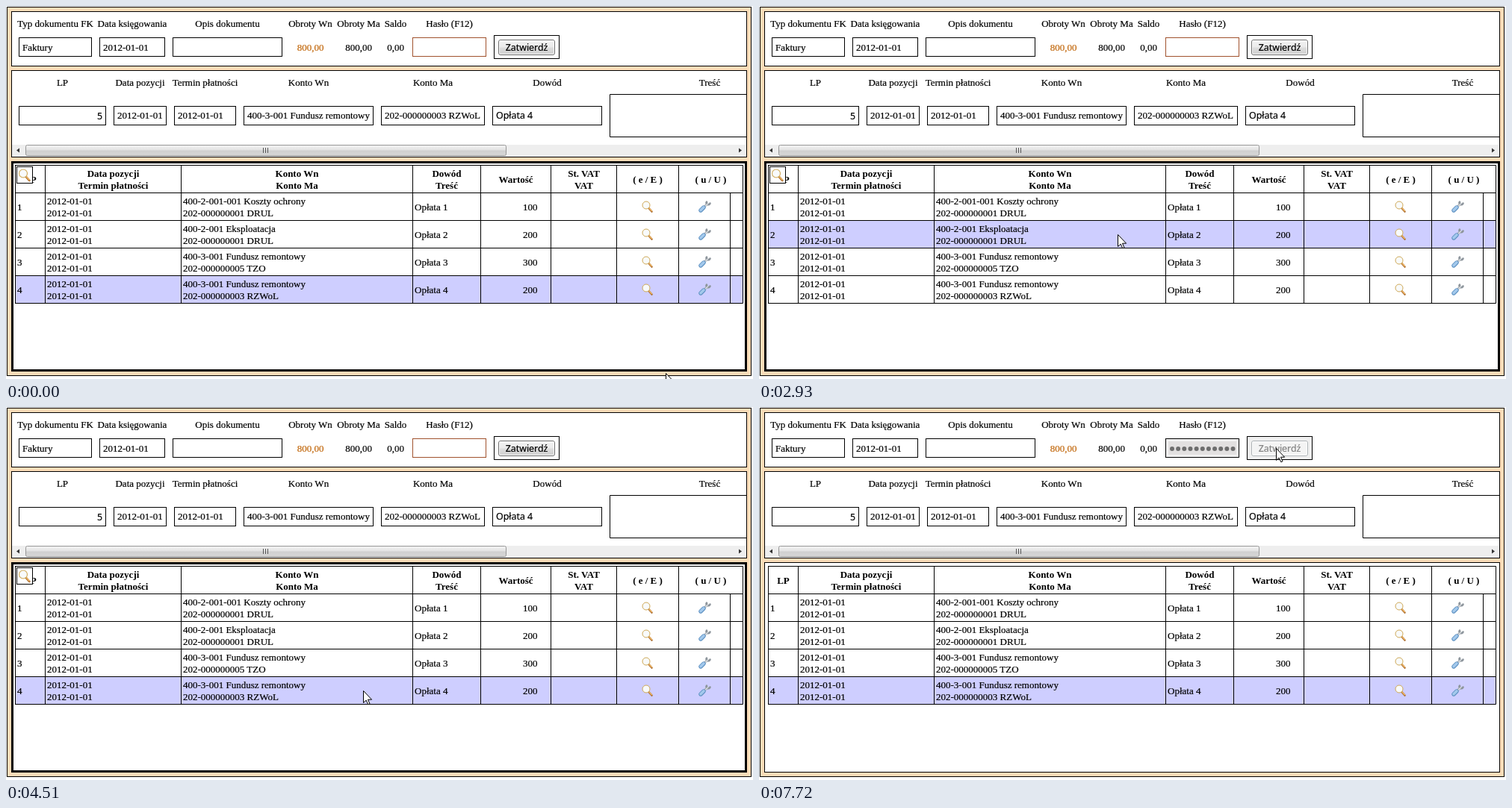
Animation, 1000 px wide and 500 px high, one loop 8000 ms. Source, as an HTML page:

```html
<!DOCTYPE html>
<html lang="pl">
<head>
<meta charset="utf-8">
<title>Dokument FK</title>
<style>
html, body { margin: 0; width: 100%; height: 100%; overflow: hidden; background: #fff; }
svg { display: block; width: 100%; height: 100%; }
text { font: 13px "Liberation Serif", serif; white-space: pre; fill: currentColor; stroke: currentColor; stroke-width: .2; }
.b { font-weight: bold; stroke: none; }
.s { font: 12.4px "Noto Sans", sans-serif; }
.line { fill: none; stroke: #000; }
.box { fill: #fff; stroke: #000; }
</style>
</head>
<body>
<svg id="stage" viewBox="0 0 1000 500" xmlns="http://www.w3.org/2000/svg"></svg>
<script>
const LOOP = 8000, STEP = 80, GAP = 10;
const TABLE = {x: 12, y: 213, head: 250, row: 37};
const stage = document.getElementById('stage');

// ---- markup helpers ----
const text = (x, y, str, anchor = 'start', cls = '', extra = '') =>
  `<text x="${x}" y="${y}" text-anchor="${anchor}" class="${cls}" ${extra}>${str}</text>`;
const mid = (x, y, str, cls, extra) => text(x, y, str, 'middle', cls, extra);
// One pixel frame inside an outer size of w by h
const box = (x, y, w, h, extra = '') =>
  `<rect class="box" x="${x + .5}" y="${y + .5}" width="${w - 1}" height="${h - 1}" ${extra}/>`;
const path = (d, extra = '') => `<path d="${d}" ${extra}/>`;
const gradient = (id, ...colors) =>
  `<linearGradient id="${id}" x2="0" y2="1">` +
  colors.map((c, i) => `<stop offset="${[0, .48, .52, 1][i]}" stop-color="${c}"/>`).join('') +
  '</linearGradient>';

// Lays items out from left to right with an equal gap
function flow(items, gap, draw, x = 17) {
  return items.map(item => {
    const out = draw(x, ...item);
    x += item[0] + gap;
    return out;
  }).join('');
}

const lens = (x, y, k = 1) => `<g transform="translate(${x} ${y}) scale(${k})">` +
  path('M3.5 4L7.5 8.5', 'stroke="#a5672a" stroke-width="2.6" stroke-linecap="round"') +
  path('M4 4L7.3 7.8', 'stroke="#f0b765" stroke-width="1.4" stroke-linecap="round"') +
  '<circle r="5" fill="#f8fafc" stroke="#cfa956"/></g>';

const wrench = (x, y) => `<g transform="translate(${x} ${y})" fill="none" stroke-linecap="round">` +
  path('M-1 1L4 -4M3 -6.5Q1.5 -4 4 -3Q6.5 -2 7.5 -4.5', 'stroke="#8d959c" stroke-width="2.6"') +
  path('M-1 1L4.5 -4', 'stroke="#dfe3e6" stroke-width="1.4"') +
  path('M-5 5L-1 1', 'stroke="#5c8fc0" stroke-width="5.4"') +
  path('M-5 4.8L-1 .8', 'stroke="#a3c9ec" stroke-width="3.6"') + '</g>';

// ---- still parts ----
function topForm() {
  const fields = [[98, 'Typ dokumentu FK', 'Faktury'], [88, 'Data księgowania', '2012-01-01'],
    [147, 'Opis dokumentu', ''], [55, 'Obroty Wn', '800,00', '#c06508'], [54, 'Obroty Ma', '800,00', '#000'],
    [25, 'Saldo', '0,00', '#000'], [99, 'Hasło (F12)', '']];
  return box(7, 7, 985, 74) + flow(fields, GAP, (x, w, label, value, color) =>
    mid(x + w / 2, 28, label) + (color
      ? mid(x + w / 2, 60, value, '', `color="${color}"`)
      : box(x, 42, w, 26, w === 99 ? 'id="field"' : '') + text(x + 5, 60, value))) +
    '<g id="dots"><rect id="dotsBg" x="548" y="46" width="91" height="18" fill="#e2e0e0"/>' +
    Array.from({length: 11}, (_, i) => `<circle cx="${553 + i * 8.15}" cy="56" r="3"/>`).join('') + '</g>' +
    '<rect id="caret" x="549" y="47" width="1" height="16"/>' +
    box(653, 39, 88, 32, 'id="cell"') +
    '<rect id="button" x="659.5" y="45.5" width="75" height="20" rx="2.5"/>' +
    '<rect x="660.5" y="46.5" width="73" height="18" rx="1.5" fill="none" stroke="#fff" opacity=".8"/>' +
    mid(697, 60, 'Zatwierdź', 's', 'id="label"');
}

function entryForm() {
  const fields = [[117, 'LP', ''], [71, 'Data pozycji', '2012-01-01'], [83, 'Termin płatności', '2012-01-01'],
    [174, 'Konto Wn', '400-3-001 Fundusz remontowy'], [139, 'Konto Ma', '202-000000003 RZWoL'],
    [147, 'Dowód', 'Opłata 4', 's'], [268, 'Treść', '']];
  return box(7, 86, 985, 117) + flow(fields, GAP, (x, w, label, value, cls) =>
    mid(x + w / 2, 107, label) +
    (label === 'Treść' ? path(`M992 118.5H${x + .5}V175.5H992`, 'class="line"') : box(x, 134, w, 26)) +
    text(x + 5, 151, value, 'start', cls)) +
    text(129, 152, '5', 'end', 's') +
    '<rect x="8" y="186" width="983" height="16" fill="#eee"/>' +
    '<rect x="26.5" y="186.5" width="643" height="14" rx="2" fill="url(#thumb)" stroke="#979797"/>' +
    path('M344.5 190v7m3-7v7m3-7v7', 'stroke="#555"') +
    path('M14 193.5l4-3v6zM985 193.5l-4-3v6z', 'fill="#333"');
}

const rowTop = i => TABLE.head + 1 + TABLE.row * i;

function table() {
  const cols = [[40, 'LP'], [182, 'Data pozycji', 'Termin płatności'], [310, 'Konto Wn', 'Konto Ma'],
    [91, 'Dowód', 'Treść'], [94, 'Wartość'], [88, 'St. VAT', 'VAT'], [83, '( e / E )'], [86, '( u / U )']];
  const rows = [['400-2-001-001 Koszty ochrony', '202-000000001 DRUL', 100],
    ['400-2-001 Eksploatacja', '202-000000001 DRUL', 200],
    ['400-3-001 Fundusz remontowy', '202-000000005 TZO', 300],
    ['400-3-001 Fundusz remontowy', '202-000000003 RZWoL', 200]];
  const bottom = rowTop(rows.length) - 1;
  const grid = flow(cols, 0, (x, w, a, b) =>
    path(`M${x + .5} ${TABLE.y}V${bottom}`, 'class="line"') +
    mid(x + w / 2 + .5, b ? 229 : 237, a, 'b') + (b ? mid(x + w / 2 + .5, 245, b, 'b') : ''), TABLE.x);
  const body = rows.map(([wn, ma, sum], i) => {
    const y = rowTop(i);
    const pair = (x, a, b) => text(x, y + 15, a) + text(x, y + 31, b);
    return path(`M12 ${y - .5}H987`, 'class="line"') + text(15, y + 23, i + 1) +
      pair(55, '2012-01-01', '2012-01-01') + pair(237, wn, ma) + text(547, y + 23, `Opłata ${i + 1}`) +
      text(711.5, y + 23, sum, 'end') + lens(857, y + 16) + wrench(935, y + 18);
  }).join('');
  return '<rect id="panel" class="box"/><rect id="select" x="13" width="973" height="36" fill="#ceceff"/>' +
    path(`M12 ${TABLE.y + .5}H986.5V${bottom + .5}H12M969.5 ${TABLE.head}V${bottom}`, 'class="line"') +
    grid + body + `<g id="zoom">${box(14, 215, 22, 23)}${lens(23, 224.5, 1.1)}</g>`;
}

const cursors = {
  arrow: path('M.5 .5V16.5L4.2 13.1 6.8 18.8 9 17.8 6.5 12.2H11.6Z',
    'id="arrow" fill="#fff" stroke="#000"'),
  hand: path('M-1.5 2Q0 -.8 1.5 2V8Q3.2 6.3 4.5 8.5Q6.2 7 7.4 9.3Q10.2 8.3 10.4 11.2V15' +
    'Q10 17.5 8.5 19V21.5H-1V19Q-3 16.5 -5.6 12.6Q-5 9.3 -1.5 12.8ZM1.5 8V11.5M4.5 9V12M7.4 10V12.5',
    'id="hand" fill="#fff" stroke="#000" stroke-linejoin="round"'),
  beam: path('M-3 -6.5h3m1 0h3M.5 -6V8M-3 8.5h3m1 0h3', 'id="beam" class="line"')
};

stage.innerHTML = '<defs>' + gradient('thumb', '#f4f4f4', '#e2e2e2', '#cfcfcf', '#d8d8d8') +
  gradient('plain', '#f3f3f3', '#ebebeb', '#dddddd', '#cfcfcf') +
  gradient('hover', '#eaf6fd', '#d9f0fc', '#bee6fd', '#a7d9f5') +
  gradient('down', '#e5f4fc', '#c4e5f6', '#98d1ef', '#68b3db') + '</defs>' +
  '<rect x="1.5" y="1.5" width="996" height="494" fill="#fbdcb8" stroke="#000"/>' +
  topForm() + entryForm() + table() +
  '<circle id="click" r="12" fill="#fcf63c" opacity=".82"/>' +
  `<g id="pointer">${Object.values(cursors).join('')}</g>`;

const el = {};
stage.querySelectorAll('[id]').forEach(n => el[n.id] = n);
const set = (id, attrs) => { for (const k in attrs) el[id].setAttribute(k, attrs[k]); };
const show = (id, on) => set(id, {visibility: on ? 'visible' : 'hidden'});

// ---- motion ----
// Pointer moves: start, end, x, y, sideways bow
const moves = [[-10, 860, 389, 406], [860, 940, 366, 406], [1020, 1580, 359, 270, -26],
  [1580, 1900, 443, 269], [2220, 2770, 480, 306], [2930, 3330, 479, 339], [3640, 4200, 478, 380],
  [5050, 5610, 587, 67, 8], [5690, 5770, 590, 52], [7170, 7330, 692, 55]];
// Click flashes: on, off; the first four pick the table rows in turn
const clicks = [[2060, 2140], [2850, 2930], [3640, 3720], [4350, 4510], [5930, 6010], [7560, 7640]];

// The pointer is sampled in whole steps and slows towards each stop
function pointerAt(t) {
  let [x, y] = [883, 492];
  for (const [start, end, x1, y1, bow = 0] of moves) {
    if (t < start) break;
    const n = Math.round((end - start) / STEP);
    const p = Math.min(1, Math.floor((t - start) / STEP + .13) / n);
    const e = 1 - (1 - p) ** 2;
    x += (x1 - x) * e + bow * 4 * e * (1 - e);
    y += (y1 - y) * e;
  }
  return [Math.round(x), Math.round(y)];
}

const inside = (x, y, x0, y0, x1, y1) => x >= x0 && x < x1 && y >= y0 && y < y1;

function update(t) {
  const [x, y] = pointerAt(t);
  const done = clicks.filter(c => c[1] <= t).length;
  const row = done ? Math.min(done, 4) - 1 : 3;
  const hovered = inside(x, y, 13, rowTop(0), 986, rowTop(4)) ? Math.floor((y - rowTop(0)) / TABLE.row) : row;
  const kind = inside(x, y, 545, 43, 642, 67) ? 'beam' : hovered !== row ? 'hand' : 'arrow';
  Object.keys(cursors).forEach(k => show(k, k === kind));
  set('pointer', {transform: `translate(${x} ${y})`});

  set('click', {cx: x, cy: y});
  show('click', clicks.some(([on, end]) => t >= on && t < end));
  set('select', {y: rowTop(row)});

  const focus = t < 6010;
  const w = focus ? 3 : 1;
  set('panel', {x: 7 + w / 2, y: 208 + w / 2, width: 985 - w, height: 282 - w, 'stroke-width': w});
  show('zoom', focus);

  const off = t >= 7720;
  const over = inside(x, y, 659, 45, 735, 66);
  show('caret', (t >= 6010 && t < 6470) || (t >= 6940 && t < 7020));
  show('dots', t >= 7020);
  show('dotsBg', off);
  set('dots', {fill: off ? '#6d6d6d' : '#222'});
  el.field.style.cssText = off ? 'fill:#f0f0f0' : 'stroke:#a0522d';
  el.cell.style.fill = off ? '#f0f0f0' : '#fff';
  const look = off ? ['#f4f4f4', '#adb2b5'] : !over ? ['url(#plain)', '#707070'] :
    t >= 7560 ? ['url(#down)', '#2c628b'] : ['url(#hover)', '#3c7fb1'];
  set('button', {fill: look[0], stroke: look[1]});
  set('label', {color: off ? '#838383' : '#000'});
}

const began = performance.now();
function frame() {
  update((performance.now() - began) % LOOP);
  requestAnimationFrame(frame);
}
frame();
</script>
</body>
</html>
```
